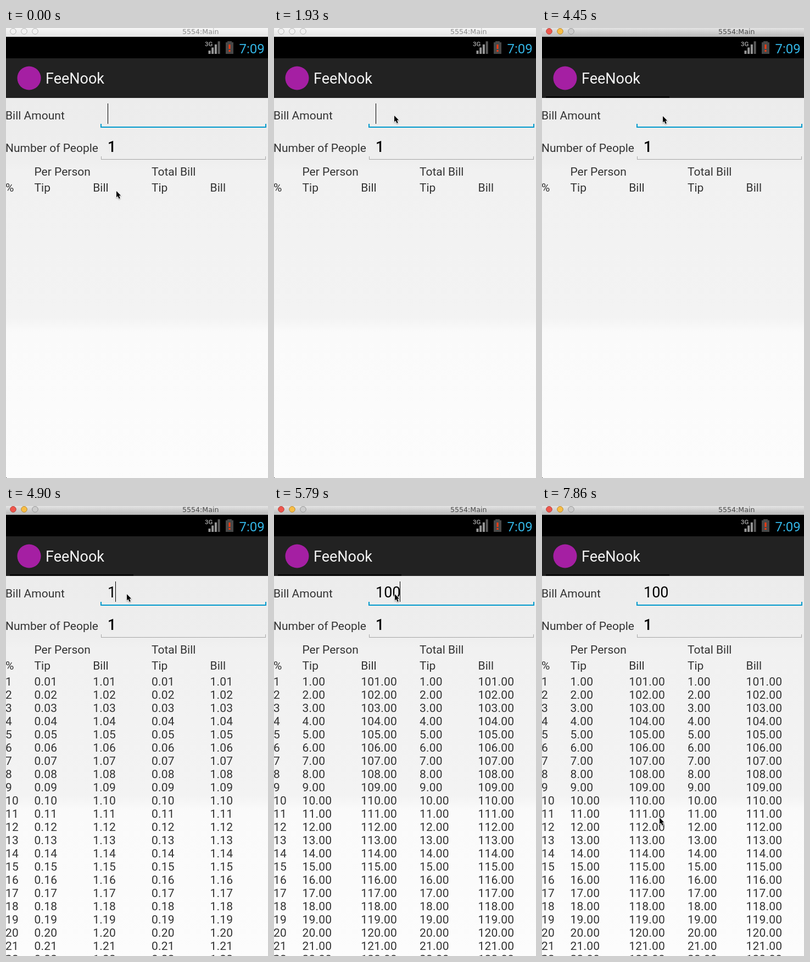
An HTML page with a canvas that plays this animation: 477 px wide and 817 px high, repeating every 8000 ms.

```html
<!DOCTYPE html>
<html lang="en">
<head>
<meta charset="utf-8">
<title>Tip calculator</title>
<style>
html, body { margin: 0; width: 100%; height: 100%; overflow: hidden; background: #fafafa; }
canvas { display: block; }
</style>
</head>
<body>
<canvas id="stage" width="477" height="817"></canvas>
<script>
const ctx = document.getElementById('stage').getContext('2d');
const LOOP = 8000;
const APP_NAME = 'FeeNook';

// Each track holds its value until the next entry: [ms, value]
const caretTrack = [
  [0, true], [440, false], [890, true], [1330, false], [1930, true], [2370, false],
  [2820, true], [3410, false], [3860, true], [4450, false], [4900, true],
  [6980, false], [7420, true], [7860, false]
];
const billTrack = [[0, ''], [4900, '1'], [5340, '10'], [5790, '100']];
const pointerTrack = [
  [0, [201, 296]], [140, [238, 198]], [290, [237, 189]], [440, [232, 179]],
  [590, [226, 170]], [740, [222, 164]], [890, [220, 160]], [1040, [219, 159]],
  [3560, [220, 160]], [6530, [201, 205]], [6680, [169, 325]], [6830, [188, 428]],
  [6980, [214, 481]], [7270, [214, 525]], [7420, [214, 566]]
];

function valueAt(track, t) {
  let value = track[0][1];
  for (const [start, v] of track) if (t >= start) value = v;
  return value;
}

function rect(x, y, w, h, color) {
  ctx.fillStyle = color;
  ctx.fillRect(x, y, w, h);
}

function text(str, x, y, size, color, family = 'Roboto, sans-serif', weight = 400) {
  ctx.font = `${weight} ${size}px ${family}`;
  ctx.fillStyle = color;
  ctx.fillText(str, x, y);
}

function gradient(y0, y1, stops) {
  const g = ctx.createLinearGradient(0, y0, 0, y1);
  for (const [y, color] of stops) g.addColorStop((y - y0) / (y1 - y0), color);
  return g;
}

function circle(x, y, r, fill, stroke) {
  ctx.beginPath();
  ctx.arc(x, y, r, 0, Math.PI * 2);
  ctx.fillStyle = fill;
  ctx.fill();
  if (stroke) {
    ctx.strokeStyle = stroke;
    ctx.lineWidth = 1;
    ctx.stroke();
  }
}

function drawTitleBar(active) {
  const ends = active ? ['#e4e4e4', '#b8b8b8'] : ['#f6f6f6', '#e4e4e4'];
  rect(0, 0, 477, 16, gradient(0, 16, [[0, ends[0]], [16, ends[1]]]));
  const lights = active
    ? [['#f0564c', '#b5443c'], ['#f7bd45', '#b88a35'], ['#cccccc', '#999999']]
    : Array(3).fill(['#f1f1f1', '#b4b4b4']);
  lights.forEach(([fill, edge], i) => circle(13 + 20 * i, 6, 5.3, fill, edge));
  text('5554:Main', 321, 11, 12.6, active ? '#4a4a4a' : '#8c8c8c', '"DejaVu Sans", sans-serif');
}

function drawStatusBar() {
  rect(0, 16, 477, 39, '#000');
  text('3G', 362, 33, 11.5, '#aaa', 'Roboto, sans-serif', 500);
  for (let i = 0; i < 4; i++) {
    const h = 6 + 5.6 * i;
    rect(368.5 + 5.7 * i, 47 - h, 4, h, i < 3 ? '#979797' : '#5a5a5a');
  }
  rect(403, 24, 8, 3, '#484848');
  rect(400, 26, 14, 21, '#484848');
  rect(405.5, 30, 3, 8, '#ff3a10');
  rect(405.5, 40, 3, 3, '#ff3a10');
  text('7:09', 424.5, 45.5, 24, '#33b5e5');
}

function drawActionBar(active) {
  rect(0, 55, 477, 72, '#222');
  if (active) rect(7, 124, 225, 3, '#080808');
  circle(42, 91, 21.5, '#a51fa3');
  text(APP_NAME, 72, 101, 27, '#f3f3f3');
}

function drawField(left, right, bottom, tick, line, color) {
  rect(left, bottom - line, right - left, line, color);
  rect(left, bottom - tick, line, tick, color);
  rect(right - line, bottom - tick, line, tick, color);
}

function drawForm(bill, caret) {
  rect(0, 127, 477, 690, gradient(127, 817, [
    [127, '#ececec'], [235, '#eeeeee'], [260, '#f1f1f1'], [525, '#f3f3f3'],
    [552, '#fafafa'], [817, '#fcfcfc']
  ]));
  text('Bill Amount', -1, 166, 21, '#333');
  text('Number of People', -1, 225, 21, '#333');
  drawField(172, 474, 181, 7, 2, '#0099cc');
  drawField(173, 473, 239, 6, 1, '#a5a5a5');
  text(bill, 185, 166, 27, '#000');
  text('1', 185, 225, 27, '#000', 'Roboto, sans-serif', 500);
  if (caret) rect(Math.floor(185 + 14.9 * bill.length), 137, 1, 37, '#000');
}

const columnX = i => 51.5 + 106.7 * i;

function drawTable(bill) {
  text('Per Person', columnX(0), 268, 21, '#333');
  text('Total Bill', columnX(2), 268, 21, '#333');
  text('%', -1, 297, 21, '#333');
  ['Tip', 'Bill', 'Tip', 'Bill'].forEach((s, i) => text(s, columnX(i), 297, 21, '#333'));
  if (!bill) return;

  ctx.letterSpacing = '0.2px';
  const amount = Number(bill);
  for (let percent = 1; percent <= 22; percent++) {
    const y = 302 + 24 * percent;
    const tip = amount * percent / 100;
    text(percent, -1, y, 21, '#333');
    [tip, amount + tip, tip, amount + tip].forEach((n, i) =>
      text(n.toFixed(2), columnX(i), y, 21, '#333'));
  }
  ctx.letterSpacing = '0px';
}

function drawPointer([x, y]) {
  ctx.save();
  ctx.translate(x, y);
  ctx.beginPath();
  ctx.moveTo(0, 0);
  for (const [px, py] of [[0, 11.5], [2.6, 9.2], [4.7, 14], [6.8, 13], [4.8, 8.5], [8.2, 8.2]]) {
    ctx.lineTo(px, py);
  }
  ctx.closePath();
  ctx.lineWidth = 1.8;
  ctx.lineJoin = 'round';
  ctx.strokeStyle = '#fff';
  ctx.shadowColor = 'rgba(0,0,0,0.35)';
  ctx.shadowBlur = 2;
  ctx.shadowOffsetY = 1;
  ctx.stroke();
  ctx.shadowColor = 'transparent';
  ctx.fillStyle = '#000';
  ctx.fill();
  ctx.restore();
}

function draw(t) {
  const bill = valueAt(billTrack, t);
  const active = t >= 3560;
  drawTitleBar(active);
  drawStatusBar();
  drawActionBar(active);
  drawForm(bill, valueAt(caretTrack, t));
  drawTable(bill);
  drawPointer(valueAt(pointerTrack, t));
  rect(0, 816, 1, 1, '#000');
}

let start;
function frame(now) {
  start ??= now;
  draw((now - start) % LOOP);
  requestAnimationFrame(frame);
}
requestAnimationFrame(frame);
</script>
</body>
</html>
```
